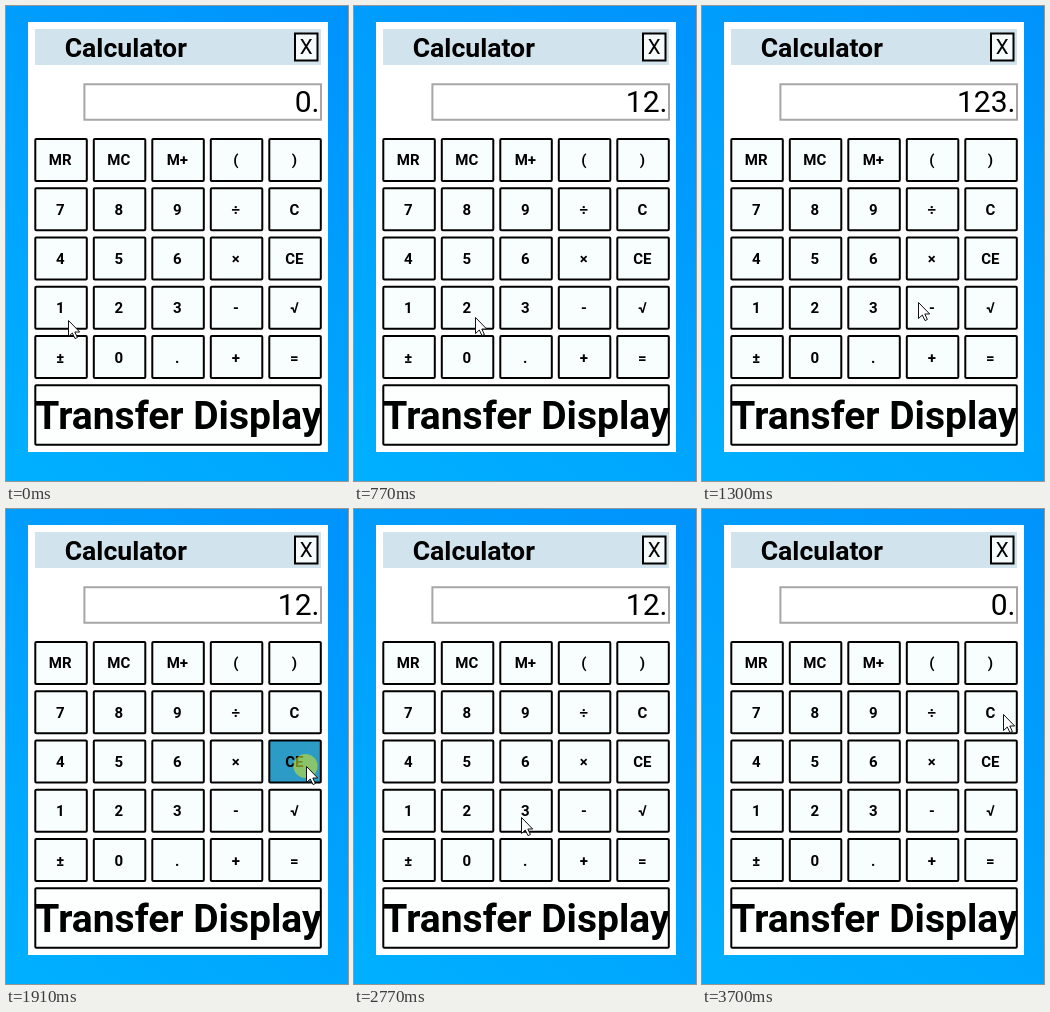
Recreate the animation shown at these times as an HTML page with a canvas. Size 342 by 475 pixels, loop 3860 ms.

```html
<!DOCTYPE html>
<html lang="en">
<head>
<meta charset="utf-8">
<title>Calculator</title>
<style>
html, body { margin: 0; width: 100%; height: 100%; overflow: hidden; }
canvas { display: block; }
</style>
</head>
<body>
<canvas id="stage" width="342" height="475"></canvas>
<script>
const ctx = document.getElementById('stage').getContext('2d');
const LOOP = 3860;
const STEP = 75; // screen refresh, also the length of a click
const COLUMNS = 5;
const KEYS = 'MR MC M+ ( ) 7 8 9 ÷ C 4 5 6 × CE 1 2 3 - √ ± 0 . + ='.split(' ');

const CLICKS = [
  { at: 70, key: '1', shows: '1.' },
  { at: 690, key: '2', shows: '12.' },
  { at: 1150, key: '3', shows: '123.' },
  { at: 1910, key: 'CE', shows: '12.' },
  { at: 2940, key: '3', shows: '123.' },
  { at: 3620, key: 'C', shows: '0.' }
];

const HOME = { x: 62, y: 314 };
const MOVES = [
  { from: 70, to: 460, x: 121, y: 311 },
  { from: 765, to: 1070, x: 172, y: 310 },
  { from: 1150, to: 1690, x: 308, y: 268 },
  { from: 1690, to: 1840, x: 300, y: 257 },
  { from: 2140, to: 2680, x: 167, y: 308 },
  { from: 2940, to: 3400, x: 300, y: 211 },
  { from: 3400, to: 3550, x: 301, y: 205 }
];

// Quick start, soft landing.
function ease(u) {
  const v = Math.pow(u, 0.75);
  return v * v * (3 - 2 * v);
}

function pointerAt(t) {
  let { x, y } = HOME;
  for (const move of MOVES) {
    const u = Math.min(1, Math.max(0, (t - move.from) / (move.to - move.from)));
    x += (move.x - x) * ease(u);
    y += (move.y - y) * ease(u);
  }
  return [Math.round(x), Math.round(y)];
}

function box(x, y, w, h, fill, edge, radius = 0) {
  ctx.beginPath();
  ctx.roundRect(x + 1, y + 1, w - 2, h - 2, radius);
  ctx.fillStyle = fill;
  ctx.fill();
  ctx.lineWidth = 2;
  ctx.strokeStyle = edge;
  ctx.stroke();
}

function text(str, x, y, size, weight = 400, align = 'center') {
  ctx.font = `${weight} ${size}px Roboto, sans-serif`;
  ctx.textAlign = align;
  ctx.fillStyle = '#000';
  ctx.fillText(str, x, y);
}

function drawWindow(shown) {
  const sky = ctx.createLinearGradient(342, 0, 0, 475);
  sky.addColorStop(0, '#0093fc');
  sky.addColorStop(1, '#00b0ff');
  ctx.fillStyle = sky;
  ctx.fillRect(0, 0, 342, 475);
  ctx.fillStyle = '#fff';
  ctx.fillRect(22, 16, 300, 430);
  ctx.fillStyle = '#d1e3ec';
  ctx.fillRect(29, 23, 286, 36);
  text('Calculator', 58.7, 51, 26.6, 700, 'left');
  box(288, 26.6, 24.5, 29, '#f5fafb', '#000');
  text('X', 300.2, 48.4, 20.5);
  box(77.4, 77.2, 238.6, 37.6, '#fff', '#a6a6a6');
  text(shown, 313.5, 106, 30, 400, 'right');
  box(28.3, 378.3, 287.5, 61.5, '#fdffff', '#000', 1);
  text('Transfer Display', 172.4, 423, 39, 700);
}

function drawKeys(held) {
  KEYS.forEach((label, n) => {
    const col = n % COLUMNS, row = Math.floor(n / COLUMNS);
    const fill = label === held ? '#2c9cc7' : '#f8fefd';
    box(28.3 + 58.5 * col, 132 + 49.25 * row, 53.5, 44, fill, '#000', 1);
    text(label, 54.2 + 58.55 * col, Math.round(159.2 + 49.4 * row), 15, 700);
  });
}

function drawPointer(x, y, clicking) {
  if (clicking) {
    ctx.beginPath();
    ctx.arc(x - 0.5, y, 12, 0, Math.PI * 2);
    ctx.fillStyle = 'rgba(200, 222, 45, 0.6)';
    ctx.fill();
  }
  const arrow = new Path2D('M.5 .5V16.5L4.3 13L7 18.6L9.4 17.5L6.8 12H11.7Z');
  ctx.save();
  ctx.translate(x, y);
  ctx.fillStyle = '#fff';
  ctx.fill(arrow);
  ctx.lineWidth = 1;
  ctx.strokeStyle = '#111';
  ctx.stroke(arrow);
  ctx.restore();
}

function draw() {
  const now = performance.now() % LOOP;
  const click = CLICKS.filter(c => c.at <= now).pop() || { at: 0, key: null, shows: '0.' };
  const elapsed = Math.floor((now - click.at) / STEP) * STEP;
  const held = elapsed < STEP ? click.key : null;
  drawWindow(click.shows);
  drawKeys(held);
  drawPointer(...pointerAt(click.at + elapsed), held !== null);
  requestAnimationFrame(draw);
}
draw();
</script>
</body>
</html>
```
